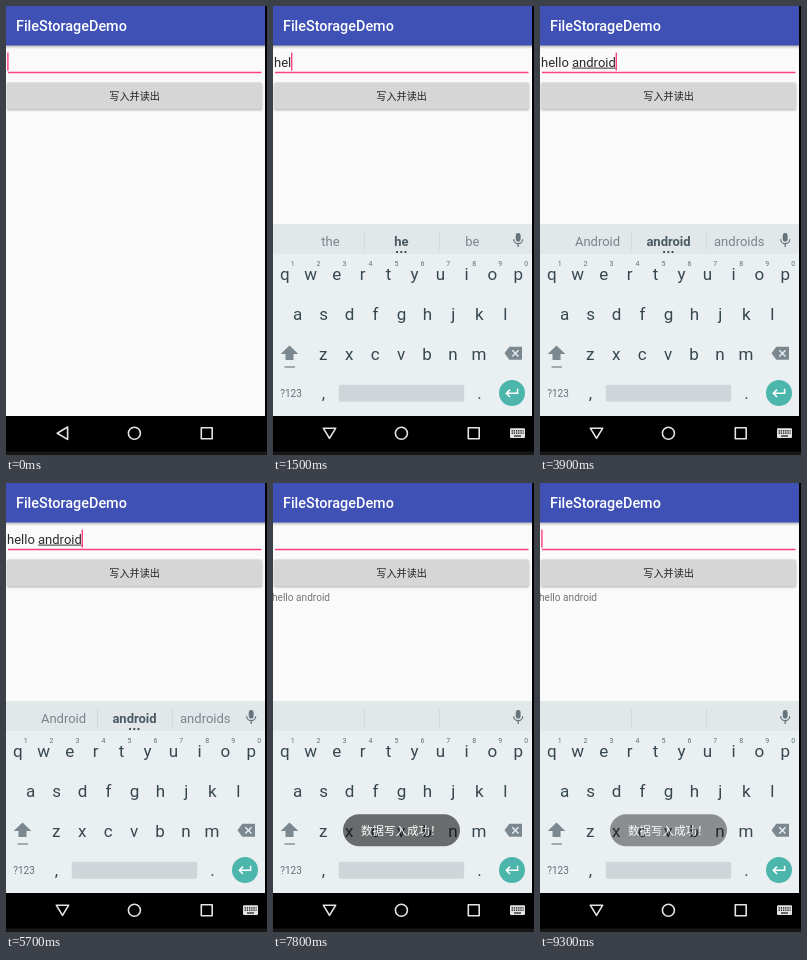
Write an HTML page that moves like this. It is 261 px wide and 449 px high and loops after 9.4 s.

```html
<!DOCTYPE html>
<html lang="zh-CN">
<head>
<meta charset="utf-8">
<title>FileStorageDemo</title>
<style>
  html, body { margin: 0; width: 100%; height: 100%; overflow: hidden; background: #000; }
  svg { display: block; width: 100%; height: 100%; }
  text { font-family: Roboto, "Noto Sans CJK SC", "Noto Sans CJK", sans-serif; white-space: pre; }
  .mid { text-anchor: middle; }
  .key { font-size: 17px; fill: #37474f; }
  .hint { font-size: 7px; fill: #60707a; }
  .word { font-size: 13px; fill: #78868d; }
  .best { font-weight: 700; fill: #4a5a63; }
  .cjk { font-family: "Noto Sans CJK SC", "Noto Sans CJK", sans-serif; }
</style>
</head>
<body>
<svg viewBox="0 0 261 449">
  <defs>
    <linearGradient id="fade" x2="0" y2="1">
      <stop stop-color="#000" stop-opacity=".28"/>
      <stop offset="1" stop-color="#000" stop-opacity="0"/>
    </linearGradient>
    <filter id="blur" x="-5%" y="-30%" width="110%" height="160%">
      <feGaussianBlur stdDeviation="1"/>
    </filter>
    <clipPath id="screen"><path d="M0 0H259V410H0Z"/></clipPath>
  </defs>
  <g clip-path="url(#screen)">
    <path d="M0 0H259V410H0Z" fill="#fafafa"/>
    <path d="M0 39H259V43H0Z" fill="url(#fade)"/>
    <path d="M0 0H259V39.5H0Z" fill="#3f51b5"/>
    <text x="10" y="25" font-size="14.4" font-weight="500" fill="#fff">FileStorageDemo</text>

    <text id="field" x="1" y="60.5" font-size="13" fill="#2b2b2b"></text>
    <rect id="compose" y="61.6" height="1" fill="#333"/>
    <path d="M2 66.5H255.5" stroke="#ff4081" stroke-width="1.4"/>
    <rect id="cursor" y="46.6" width="1.4" height="18" fill="#ff4081"/>

    <rect id="shadow" x="1" y="77.6" width="255" height="26.6" rx="1.5" filter="url(#blur)"/>
    <rect id="button" x="1" y="76.5" width="255" height="26.5" rx="1.5"/>
    <text class="mid cjk" x="128.6" y="93.7" font-size="10.1" fill="#222">写入并读出</text>
    <text id="result" x="-1" y="118" font-size="10.1" fill="#757575">hello android</text>

    <g id="keyboard">
      <path d="M0 218H259V410H0Z" fill="#eaeff1"/>
      <path d="M0 218H259V248H0Z" fill="#e2e7ea"/>
      <path d="M91.5 226V244M166.5 226V244" stroke="#cfd6da" stroke-width=".8"/>
      <g id="words">
        <text class="word mid" x="57.5" y="239.5"></text>
        <text class="word best mid" x="128.5" y="239.5"></text>
        <text class="word mid" x="199.3" y="239.5"></text>
        <path d="M123.2 246H133.5" stroke="#37474f" stroke-width="1.8" stroke-dasharray="1.8 2.4"/>
      </g>
      <g fill="none" stroke="#66757d" stroke-width="1.3">
        <rect x="243.4" y="227.6" width="3.6" height="7.4" rx="1.8" fill="#66757d"/>
        <path d="M240.7 233.2a4.5 4.5 0 0 0 9 0M245.2 237.6V241"/>
      </g>
      <g id="keys"></g>
      <path d="M16.5 339.5L25.3 348H20.5V354H12.5V348H7.7Z" fill="#7b888f"/>
      <path d="M11.5 361H22" stroke="#7b888f" stroke-width="1.3"/>
      <path d="M231.5 347.3L236.3 340.8H249V353.8H236.3Z" fill="#7b888f"/>
      <path d="M239.3 344.2L245.5 350.4M245.5 344.2L239.3 350.4" stroke="#eaeff1" stroke-width="1.4"/>
      <rect x="65.8" y="378.8" width="125.4" height="17" rx="2" fill="#cfd5d8"/>
      <text class="mid" x="18" y="390.8" font-size="10" fill="#60707a">?123</text>
      <circle cx="239" cy="387" r="13" fill="#4db6ac"/>
      <path d="M244.6 382.8V387.3H233.6M237 383.6L233.3 387.3L237 391" fill="none" stroke="#fff" stroke-width="1.5"/>
    </g>
    <g id="toast">
      <rect x="70" y="331.3" width="117" height="32" rx="16" fill="#000" fill-opacity=".65"/>
      <text class="cjk" x="88" y="351.7" font-size="11.5" fill="#fff">数据写入成功！</text>
    </g>
  </g>

  <path d="M0 445.5H261V449H0Z" fill="#171717"/>
  <g fill="none" stroke="#e4e4e4" stroke-width="1.6" stroke-linejoin="round">
    <path id="back"/>
    <circle cx="128.4" cy="427.2" r="6"/>
    <path d="M195.3 421.8H206.2V432.7H195.3Z"/>
  </g>
  <g id="imeIcon">
    <rect x="237" y="422.3" width="15" height="9.8" rx="1" fill="#e4e4e4"/>
    <path d="M238.6 424.8H250.6M238.6 427.2H250.6" stroke="#000" stroke-width="1.2" stroke-dasharray="1.3 .9"/>
    <path d="M241 430H248" stroke="#000" stroke-width="1.1"/>
  </g>
</svg>
<script>
const LOOP = 9400;
const $ = id => document.getElementById(id);
const set = (el, attrs) => { for (const k in attrs) el.setAttribute(k, attrs[k]); };
const show = (el, on) => set(el, { visibility: on ? 'visible' : 'hidden' });

function label(text, x, y, cls) {
  const el = document.createElementNS('http://www.w3.org/2000/svg', 'text');
  set(el, { x, y, class: cls + ' mid' });
  el.textContent = text;
  $('keys').append(el);
}

[['qwertyuiop', 11.8, 274], ['asdfghjkl', 24.6, 314], ['zxcvbnm', 50.2, 353.6]]
  .forEach(([row, x, y]) => [...row].forEach((c, i) => label(c, x + i * 25.95, y, 'key')));
[...'1234567890'].forEach((c, i) => label(c, 19.6 + i * 25.95, 259.5, 'hint'));
label(',', 50.4, 392.5, 'key');
label('.', 206.4, 392.5, 'key');

const start = { text: '', cursor: 1, ime: 0, words: '', compose: 0, press: 0, result: 0, toast: 0 };

// [time, changed values]
const steps = [
  [200, { cursor: 0 }],
  [600, { cursor: 1, ime: .35 }],
  [700, { ime: .8 }],
  [800, { ime: 1 }],
  [1100, { text: 'h' }],
  [1200, { words: 'have h he' }],
  [1300, { text: 'he' }],
  [1400, { words: 'the he be' }],
  [1500, { text: 'hel' }],
  [1600, { text: 'hell', words: 'help hel held' }],
  [1700, { words: 'hello hell help' }],
  [2000, { text: 'hello' }],
  [2100, { words: 'Hello hello hellos', compose: 1 }],
  [2400, { text: 'hello ', compose: 0 }],
  [2600, { text: 'hello a' }],
  [2700, { words: 'and a as' }],
  [2800, { text: 'hello an' }],
  [2900, { words: 'and an any' }],
  [3000, { text: 'hello and', words: 'an and any' }],
  [3400, { text: 'hello andr' }],
  [3500, { words: 'Andrew andr and' }],
  [3600, { text: 'hello andro' }],
  [3700, { text: 'hello androi', words: 'Android andro androids' }],
  [3800, { text: 'hello android' }],
  [3900, { words: 'Android android androids', compose: 1 }],
  [4400, { cursor: 0 }],
  [4800, { cursor: 1 }],
  [5300, { cursor: 0 }],
  [5700, { cursor: 1 }],
  [6200, { cursor: 0 }],
  [6600, { cursor: 1 }],
  [7100, { press: .5 }],
  [7200, { text: '', compose: 0, press: 1, result: 1 }],
  [7600, { words: '', press: .4, toast: .15 }],
  [7700, { cursor: 0, press: 0, toast: .5 }],
  [7800, { toast: .85 }],
  [7900, { toast: 1 }],
  [8200, { cursor: 1 }],
  [8600, { cursor: 0 }],
  [9100, { cursor: 1, toast: .9 }],
  [9200, { toast: .78 }],
  [9300, { toast: .62 }]
];

const field = $('field');
const slots = $('words').querySelectorAll('text');

function draw(s) {
  field.textContent = s.text;
  const end = s.text ? field.getComputedTextLength() : 0;
  const word = s.text.lastIndexOf(' ') + 1;
  const from = word ? field.getSubStringLength(0, word) : 0;
  set($('compose'), { x: 1 + from, width: Math.max(0, end - from) });
  show($('compose'), s.compose);
  set($('cursor'), { x: 1.2 + Math.max(0, end - .4) });
  show($('cursor'), s.cursor);

  const shade = 214 - 11 * s.press;
  set($('button'), { fill: `rgb(${shade},${shade},${shade})` });
  set($('shadow'), { 'fill-opacity': .28 + .25 * s.press });
  show($('result'), s.result);

  const words = s.words.split(' ');
  slots.forEach((el, i) => { el.textContent = words[i] || ''; });
  $('words').style.display = s.words ? '' : 'none';

  set($('keyboard'), { opacity: s.ime, transform: `translate(0 ${(1 - s.ime) * 60})` });
  show($('imeIcon'), s.ime);
  set($('back'), { d: s.ime ? 'M50.3 422.2H62.7L56.5 432.3Z' : 'M61.6 421V433.4L51.2 427.2Z' });
  set($('toast'), { opacity: s.toast });
}

let last = -1;
const t0 = performance.now();

function tick() {
  const t = (performance.now() - t0) % LOOP;
  const count = steps.filter(([at]) => at <= t).length;
  if (count !== last) {
    draw(Object.assign({}, start, ...steps.slice(0, count).map(step => step[1])));
    last = count;
  }
  requestAnimationFrame(tick);
}
tick();
</script>
</body>
</html>
```
